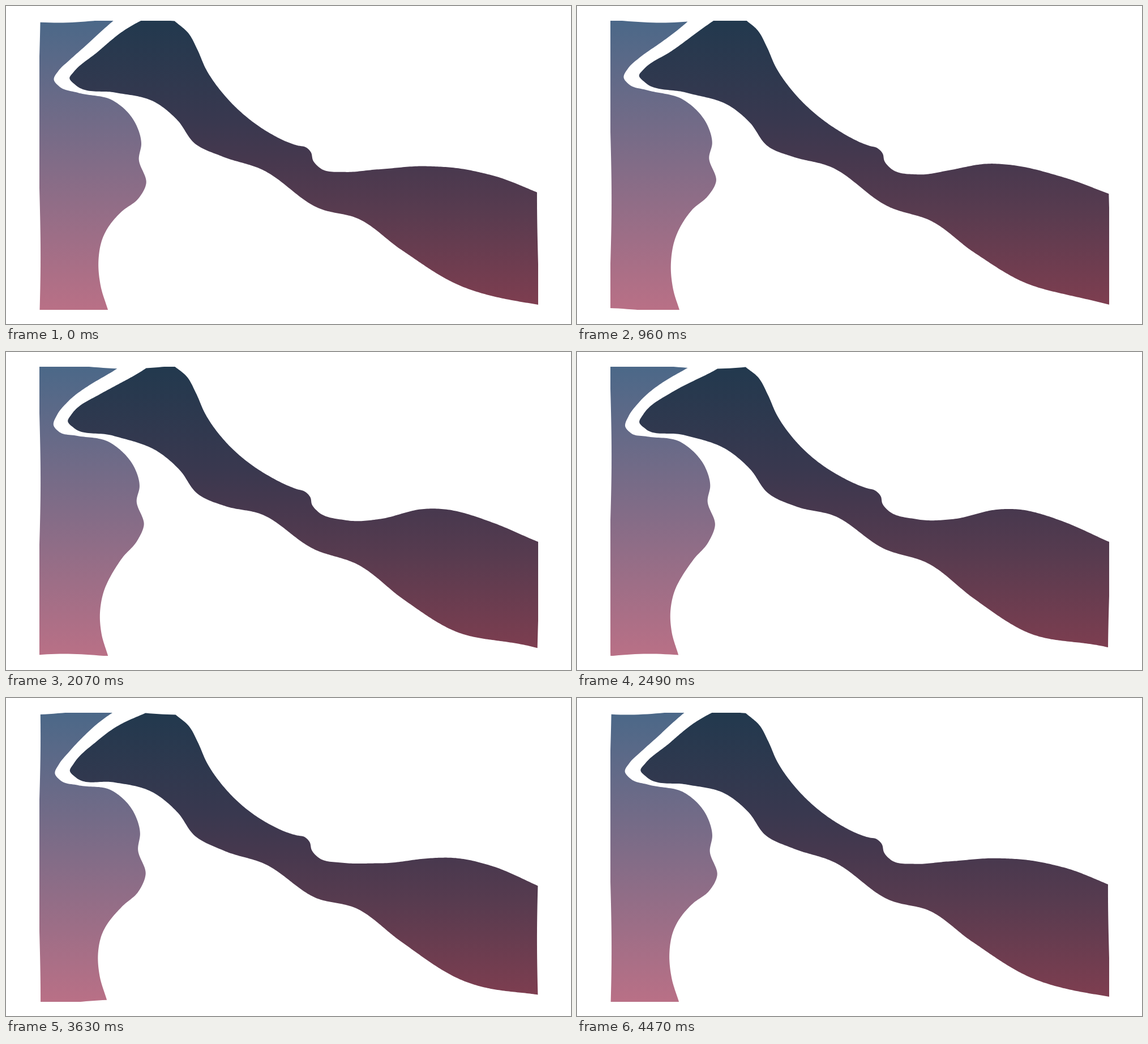
An HTML page with a canvas for the animation above (4.5 s loop, 998 px wide and 561 px high).

```html
<!DOCTYPE html>
<html lang="en">
<head>
<meta charset="utf-8">
<title>Drifting shapes</title>
<style>
  html, body { margin: 0; width: 100%; height: 100%; overflow: hidden; background: #fff; }
  canvas { display: block; }
</style>
</head>
<body>
<canvas id="stage" width="998" height="561"></canvas>
<script>
const LOOP = 4500, STEP = 30, RAD = Math.PI / 180;
const [L, T, R, B] = [59, 26, 940, 536];
const ctx = document.getElementById('stage').getContext('2d');

// A plane wave runs up and to the right, and pushes every point sideways to its course
const wave = { angle: -30 * RAD, length: 232, height: 4.1, offset: 100 * RAD };
const dir = [Math.cos(wave.angle), Math.sin(wave.angle)];

function warp([x, y], turn) {
  const along = (x * dir[0] + y * dir[1]) / wave.length * 2 * Math.PI;
  const push = wave.height * Math.cos(turn - along + wave.offset);
  return [x - dir[1] * push, y + dir[0] * push];
}

const mix = (p, q, f) => p.map((v, i) => v + (q[i] - v) * f);

function line(p, q) {
  const n = Math.ceil(Math.hypot(q[0] - p[0], q[1] - p[1]) / 8);
  return Array.from({ length: n + 1 }, (_, i) => mix(p, q, i / n));
}

// Smooth curve through key points, given as "x,y x,y ..."
function curve(text) {
  const p = text.split(' ').map(s => s.split(',').map(Number));
  const gap = p.slice(1).map((q, i) => Math.hypot(q[0] - p[i][0], q[1] - p[i][1]));
  const slope = gap.map((g, i) => p[i].map((v, k) => (p[i + 1][k] - v) / g));
  const tangent = p.map((_, i) => {
    if (!i) return slope[0];
    if (i === gap.length) return slope[i - 1];
    return mix(slope[i - 1], slope[i], gap[i - 1] / (gap[i - 1] + gap[i]));
  });
  const out = [p[0]];
  gap.forEach((g, i) => {
    const n = Math.ceil(g / 3);
    for (let j = 1; j <= n; j++) {
      const f = j / n, e = f * f * (3 - 2 * f);
      const a = g * f * (1 - f) ** 2, b = g * f * f * (f - 1);
      out.push(mix(p[i], p[i + 1], e).map((v, k) => v + tangent[i][k] * a + tangent[i + 1][k] * b));
    }
  });
  return out;
}

// Joins open pieces into one outline with straight sides between them
const outline = (...parts) => parts.flatMap((part, i) => {
  const next = parts[(i + 1) % parts.length];
  return [...part, ...line(part[part.length - 1], next[0])];
});

const coast = outline(
  curve('194.5,26 150,58.5 110,92.5 92,112.5 84.5,130 95,142.5 125,150.5 185,162.4 ' +
    '228,206 237.3,239.5 232.6,265.5 245.5,310 232,338 205,363.5 170,421 164.5,455 167.7,495 180,536'),
  [[L, B]], [[L, T]]);

const ridge = outline(
  curve('246,26 200,52.3 165,76 118,113 110.8,124.7 122,137.3 190,149.7 265,172 305,205 ' +
    '335,245.5 385,269 450,287 550,353 620,374 700,433 795,492 940,524.5'),
  curve('940,332.3 860,299.8 780,281 740,280 660,291.5 600,294.5 553,283.7 541,270 538,257 ' +
    '528,247 515,243.8 460,218.5 385,156 353,111 337,75 321,46 297.5,26'));

function gradient(...stops) {
  const g = ctx.createLinearGradient(0, T, 0, B);
  for (const [at, color] of stops) g.addColorStop(at, color);
  return g;
}
const light = gradient([0, '#4b6888'], [1, '#b97086']);
const dark = gradient([0, '#22394e'], [.35, '#39384f'], [.48, '#46384e'], [.65, '#573b4f'], [1, '#803e50']);

function fill(points, color, turn) {
  ctx.beginPath();
  for (const p of points) ctx.lineTo(...warp(p, turn));
  ctx.fillStyle = color;
  ctx.fill();
}

ctx.beginPath();
ctx.rect(L, T, R - L, B - T);
ctx.clip();

const start = performance.now();
function tick() {
  const t = (performance.now() - start) % LOOP;
  const turn = Math.floor(t / STEP) * STEP / LOOP * 2 * Math.PI;
  ctx.clearRect(0, 0, 998, 561);
  fill(coast, light, turn);
  fill(ridge, dark, turn);
  requestAnimationFrame(tick);
}
tick();
</script>
</body>
</html>
```
